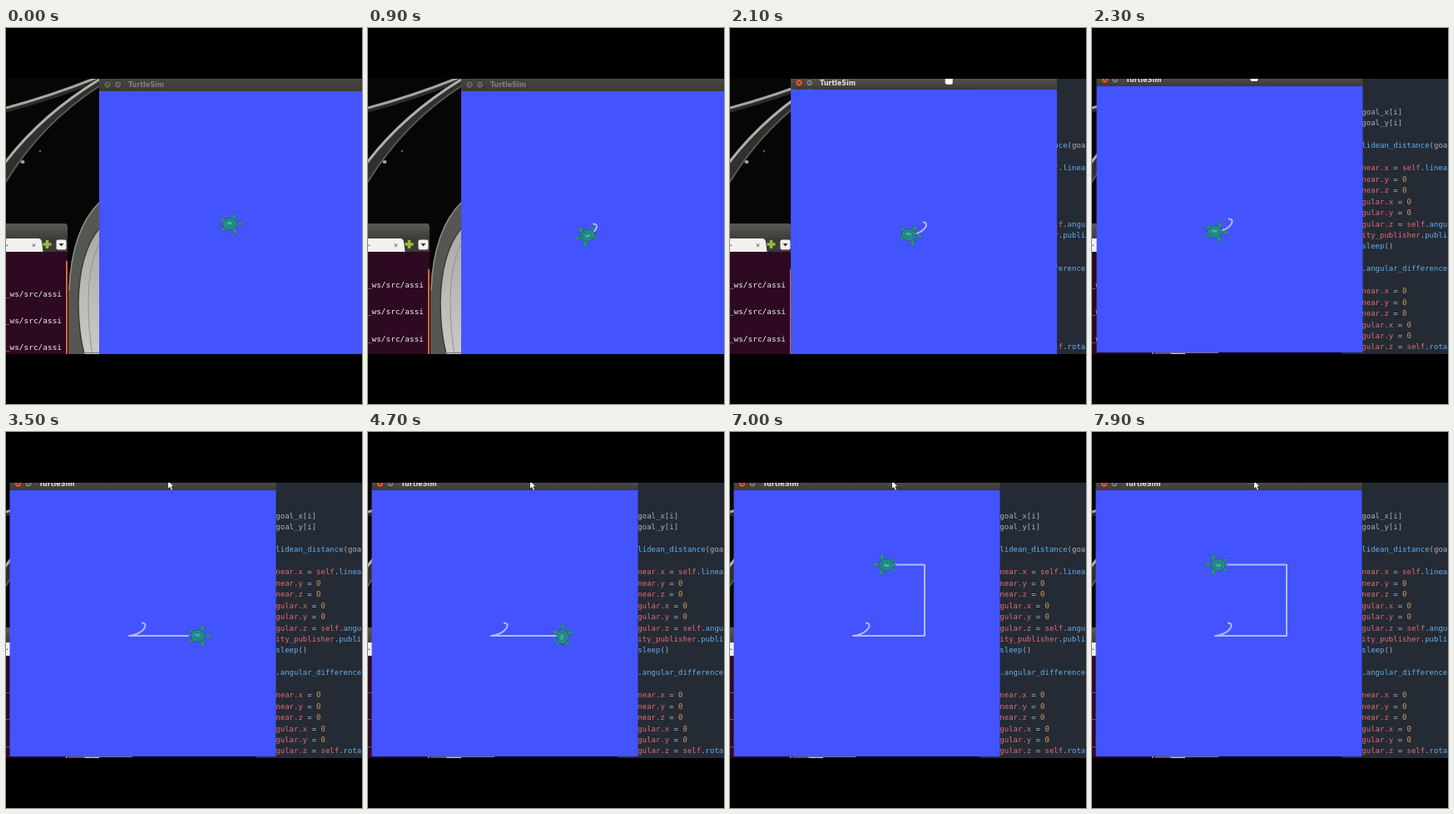
An HTML page with a canvas for the animation above (8 s loop, 428 by 452 pixels).

```html
<!DOCTYPE html>
<html lang="en">
<head>
<meta charset="utf-8">
<title>TurtleSim</title>
<style>
  html, body { margin: 0; width: 100%; height: 100%; overflow: hidden; background: #000; }
  canvas { display: block; }
</style>
</head>
<body>
<canvas id="stage" width="428" height="452"></canvas>
<script>
const ctx = document.getElementById('stage').getContext('2d');
const LOOP = 8000;
const MONO = '"DejaVu Sans Mono", monospace';
const GRAY = '#abb2bf', RED = '#e06c75', BLUE = '#61afef', ORANGE = '#d19a66';

const clamp = v => Math.max(0, Math.min(1, v));
const mix = (a, b, u) => a + (b - a) * u;
const smooth = u => u * u * (3 - 2 * u);
const span = (t, from, to) => smooth(clamp((t - from) / (to - from)));
// Proportional controller: the remaining error shrinks exponentially.
const approach = (t, start, rate) => t < start ? 0 : 1 - Math.exp(-rate * (t - start) / 1000);

function rect(x, y, w, h, fill) {
  ctx.fillStyle = fill;
  ctx.fillRect(x, y, w, h);
}
function shape(d, fill, stroke, width = 1) {
  const path = new Path2D(d);
  if (fill) { ctx.fillStyle = fill; ctx.fill(path); }
  if (stroke) { ctx.strokeStyle = stroke; ctx.lineWidth = width; ctx.stroke(path); }
}
function ellipse(x, y, rx, ry, angle, fill, stroke, width = 1) {
  ctx.beginPath();
  ctx.ellipse(x, y, rx, ry, angle, 0, Math.PI * 2);
  ctx.fillStyle = fill;
  ctx.fill();
  if (stroke) { ctx.strokeStyle = stroke; ctx.lineWidth = width; ctx.stroke(); }
}
function text(str, x, y, font, fill, align = 'left') {
  ctx.font = font;
  ctx.textAlign = align;
  ctx.fillStyle = fill;
  ctx.fillText(str, x, y);
}
function gradient(y0, y1, top, bottom) {
  const g = ctx.createLinearGradient(0, y0, 0, y1);
  g.addColorStop(0, top);
  g.addColorStop(1, bottom);
  return g;
}

// Turtle position and heading inside the blue field.
function pose(t) {
  if (t < 1300) {
    const u = approach(t, 400, 4), v = 1 - u;
    const curve = (a, b, c, d) => v*v*v*a + 3*v*v*u*b + 3*v*u*u*c + u*u*u*d;
    const slope = (a, b, c, d) => v*v*(b - a) + 2*v*u*(c - b) + u*u*(d - c);
    const px = [158.5, 168, 162, 143.5], py = [159.5, 159, 173, 175];
    return { x: curve(...px), y: curve(...py), angle: Math.atan2(slope(...py), slope(...px)) };
  }
  const turns = approach(t, 3500, 3.5) + approach(t, 5900, 3.8);
  return {
    x: 143.5 + 86 * (approach(t, 2300, 3.2) - approach(t, 6750, 3.2)),
    y: 175 - 85.5 * approach(t, 4700, 3.2),
    angle: 3.03 * (1 - approach(t, 1300, 3.9)) - turns * Math.PI / 2
  };
}

function wallpaper() {
  rect(0, 61, 112, 331, '#060606');
  shape('M0 99Q60 83 112 62', null, '#2b2b29', 5);
  shape('M0 96Q56 81 108 60', null, '#a5a5a1', 3);
  shape('M-2 160Q42 102 112 60L112 71Q42 116 -2 190Z', '#30302e');
  shape('M-2 188Q42 115 112 70', null, '#5c5c58', 1.5);
  shape('M-2 163Q42 105 112 62', null, '#b0b0ac', 3);
  ellipse(20, 161, 2.5, 2, 0, '#a5a5a1');
  ellipse(41, 148, 1.5, 1.5, 0, '#555552');
  shape('M112 209Q78 242 75 315V392H112Z', '#565652');
  shape('M112 210Q79 243 76 315', null, '#8b8b86', 1.5);
  shape('M112 241Q88 270 87 330Q87 364 94 392H112Z', gradient(241, 392, '#aaaaa6', '#c9c9c5'));
  shape('M112 241Q88 270 87 330Q87 364 94 392', null, '#3c3c39', 1.5);
  shape('M112 259Q99 284 99 330Q99 364 104 392', null, '#92928e', 1);
}

function terminal(t) {
  const scroll = t < 400 ? 0 : 10.8;
  shape('M0 235H70Q74 235 74 239V270H0Z', gradient(235, 254, '#5a5953', '#3c3b37'));
  shape('M0 253H39Q42 253 43 257L44.5 269H0Z', '#f2f1f0');
  text('…', -3, 262, '9px ' + MONO, '#444');
  text('×', 33.5, 264, '9px ' + MONO, '#555', 'center');
  shape('M49.5 255V265M44.5 260H54.5', null, '#93bd3a', 3.5);
  ctx.beginPath();
  ctx.roundRect(60.5, 254.5, 12, 12, 2);
  ctx.fillStyle = '#f2f1f0';
  ctx.fill();
  shape('M63.5 259H69.5L66.5 262.5Z', '#333');
  rect(0, 269, 74, 123, '#2d0922');
  rect(72, 280 + scroll * .9, 2, 112, '#d9623a');
  for (let i = 0; i < 3; i++)
    text('_ws/src/assi', 67, 322.5 + i * 32.4 - scroll, '9.45px ' + MONO, '#f2ecef', 'right');
}

const zero = name => [[name, RED], [' = ', GRAY], ['0', ORANGE]];
const assign = (name, method) => [[name, RED], [' = ', GRAY], ['self', RED], ['.', GRAY], [method, BLUE]];
const twist = [zero('near.y'), zero('near.z'), zero('gular.x'), zero('gular.y')];
const code = [
  [['goal_x[i]', GRAY]], [['goal_y[i]', GRAY]], [],
  [['lidean_distance', BLUE], ['(goa', GRAY]], [],
  assign('near.x', 'linea'), ...twist, assign('gular.z', 'angu'),
  [['ity_publisher', RED], ['.', GRAY], ['publi', BLUE]],
  [['sleep', BLUE], ['()', GRAY]], [],
  [['.', GRAY], ['angular_difference', BLUE]], [],
  zero('near.x'), ...twist, assign('gular.z', 'rota')
];

function editor() {
  rect(300, 61, 128, 331, '#252b34');
  code.forEach((line, row) => {
    let x = 324.3;
    for (const [str, color] of line) {
      text(str, x, 104 + row * 13.45, '9px ' + MONO, color);
      x += ctx.measureText(str).width;
    }
  });
}

function turtle({ x, y, angle }) {
  const skin = '#2f8f80', edge = '#20686c';
  ctx.save();
  ctx.translate(x, y);
  ctx.rotate(angle);
  for (const side of [-1, 1]) {
    ellipse(4, side * 8.5, 2.3, 4, side * -.3, skin, edge, .6);
    ellipse(-9, side * 5.5, 3, 1.9, side * -.5, skin, edge, .6);
  }
  shape('M-9 0L-13 0', null, edge, 1.2);
  ellipse(11, 0, 3.4, 2, 0, skin, edge, .6);
  ellipse(-1.5, 0, 8.5, 6.8, 0, '#26938f', edge);
  shape('M-6 -3L-2 -4L3 -3L5 0L3 3L-2 4L-6 3ZM-2 -4V4M3 -3V3', null, '#1d777a', .8);
  ellipse(-2, -1, 3, 1.5, 0, '#45b69b');
  ctx.restore();
}

function simulator(t, left, top) {
  const active = t >= 1950;
  ctx.save();
  ctx.translate(left, top);
  rect(0, -15, 320, 15, gradient(-15, 0, active ? '#5a5851' : '#47463f', '#3a3935'));
  ellipse(10, -8, 4.5, 4.5, 0, active ? '#df5a35' : '#64625b', '#2f2e2a');
  ellipse(22.5, -8, 4.5, 4.5, 0, active ? '#77746b' : '#64625b', '#2f2e2a');
  shape('M8 -10L12 -6M12 -10L8 -6M20.5 -8H24.5', null, '#3d3b36');
  text('TurtleSim', 35, -5, 'bold 8px "DejaVu Sans", sans-serif', active ? '#e3dfd6' : '#827f77');
  rect(0, 0, 320, 320, '#4354ff');

  ctx.beginPath();
  for (let s = 400; s < t; s += 20) {
    const p = pose(s);
    ctx.lineTo(p.x, p.y);
  }
  const now = pose(t);
  ctx.lineTo(now.x, now.y);
  ctx.strokeStyle = '#b5b9f6';
  ctx.lineWidth = 2;
  ctx.lineJoin = 'round';
  ctx.stroke();
  turtle(now);
  ctx.restore();
}

function pointer(t, drag) {
  if (t < 1400) return;
  const enter = clamp((t - 1400) / 300), rise = span(t, 1700, 1940);
  const x = mix(mix(mix(150, 274, enter), 302, rise), 194.5, drag);
  const y = mix(mix(mix(391, 247.5, enter), 64, rise), 58, drag);
  ctx.save();
  ctx.translate(x, y);
  if (t >= 1950 && t < 2400) {
    ctx.beginPath();
    ctx.roundRect(-4, -4, 9, 10, 2);
    ctx.fillStyle = '#fff';
    ctx.fill();
  } else {
    shape('M0 0V10.5L2.4 8.5L4.2 12.4L6.1 11.5L4.4 7.7H7.5Z', '#fff', '#222', .8);
  }
  ctx.restore();
}

function draw(t) {
  const drag = span(t, 1970, 2290);
  const settle = span(t, 2320, 2450);
  rect(0, 0, 428, 452, '#000');
  ctx.save();
  ctx.beginPath();
  ctx.rect(0, 61, 428, 331);
  ctx.clip();
  wallpaper();
  terminal(t);
  editor();
  rect(93, 390, 59, 1, '#77777a');
  simulator(t, mix(112, 5.5, drag) - settle, mix(76, 70, drag));
  pointer(t, drag);
  ctx.restore();
}

function frame() {
  draw(performance.now() % LOOP);
  requestAnimationFrame(frame);
}
frame();
</script>
</body>
</html>
```
